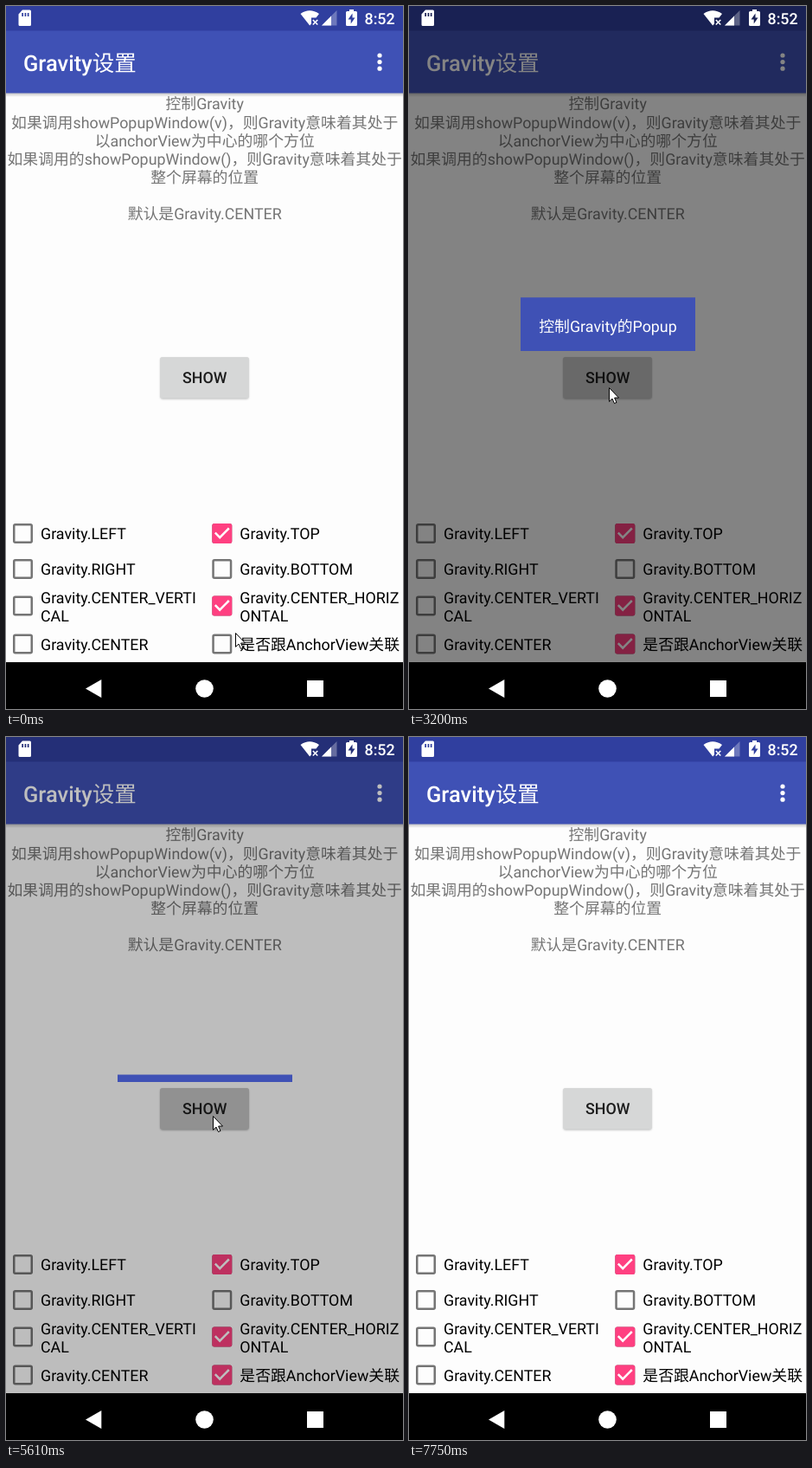
Recreate the animation shown at these times as an HTML page. Size 459 by 811 pixels, loop 8.15 s.

```html
<!DOCTYPE html>
<html lang="zh-CN">
<head>
<meta charset="utf-8">
<title>Gravity</title>
<style>
html, body { margin: 0; width: 100%; height: 100%; overflow: hidden; background: #000; }
svg { display: block; width: 459px; height: 811px; font: 17.85px Roboto, "Noto Sans CJK SC", "Noto Sans CJK", sans-serif; }
text { text-rendering: geometricPrecision; }
.medium { font-weight: 500; }
.middle { text-anchor: middle; }
</style>
</head>
<body>
<svg viewBox="0 0 459 811">
  <defs>
    <linearGradient id="shade" x2="0" y2="1">
      <stop stop-opacity=".24"/><stop offset="1" stop-opacity="0"/>
    </linearGradient>
    <filter id="blur" x="-10%" y="-20%" width="120%" height="150%"><feGaussianBlur stdDeviation="1"/></filter>
    <clipPath id="buttonClip"><rect x="178" y="405" width="103" height="47.500" rx="2.5"/></clipPath>
    <clipPath id="popupClip"><rect x="129" y="190" width="202" height="208"/></clipPath>
    <clipPath id="pageClip"><rect width="459" height="757"/></clipPath>
  </defs>

  <rect width="459" height="757" fill="#fdfdfd"/>
  <rect y="100" width="459" height="5" fill="url(#shade)"/>
  <rect width="459" height="29" fill="#303f9f"/>
  <rect y="28.500" width="459" height="72" fill="#3f51b5"/>
  <text x="20" y="75" class="medium" font-size="25.5" fill="#fff">Gravity设置</text>
  <g fill="#fff"><circle cx="432" cy="57" r="2.6"/><circle cx="432" cy="64.6" r="2.6"/><circle cx="432" cy="72.2" r="2.6"/></g>
  <g id="intro" class="middle" fill="#757575"></g>

  <rect id="buttonShadow" x="178.500" y="406" width="102" height="47.500" rx="2.5" filter="url(#blur)"/>
  <rect x="178" y="405" width="103" height="47.500" rx="2.5" fill="#d6d7d7"/>
  <g clip-path="url(#buttonClip)"><circle id="buttonRipple"/></g>
  <text x="229.7" y="435.4" class="medium middle" fill="#1c1c1c">SHOW</text>

  <g clip-path="url(#pageClip)"><circle id="checkRipple" cx="250" cy="736"/></g>
  <g id="boxes"></g>
  <rect id="dim" width="459" height="757"/>

  <g fill="#fff">
    <path fill-rule="evenodd" d="M19 4.500H27.500Q29 4.500 29 6V21.500Q29 23 27.500 23H16Q14.500 23 14.500 21.500V9.500ZM18.300 8V12H20V8ZM21.600 8V12H23.300V8ZM24.800 8V12H26.500V8Z"/>
    <path d="M340.500 9Q351 1.500 362 9L358.500 13.500H353V20.500L351.200 22.500Z"/>
    <path d="M354.800 16L360.300 21.500M360.300 16L354.800 21.500" stroke="#fff" stroke-width="1.600"/>
    <path d="M365 22.500L382.500 5V22.500Z" opacity=".3"/>
    <path d="M365 22.500L376 11.500V22.500Z"/>
    <path fill-rule="evenodd" d="M397 4H402V6H404.500Q406 6 406 7.500V21.500Q406 23 404.500 23H394.500Q393 23 393 21.500V7.500Q393 6 394.500 6H397ZM400.500 8.500L395.500 15.500H398.700V20.500L403.500 13.500H400.500Z"/>
    <text x="414.500" y="21" class="medium">8:52</text>
  </g>

  <g clip-path="url(#popupClip)"><g id="popup">
    <rect x="129" y="190" width="202" height="210" fill="#3f51b5"/>
    <path d="M132 258.500H328M132 329.500H328" stroke="#b3bae0"/>
    <g id="items" class="middle" fill="#fff"></g>
  </g></g>

  <rect y="757" width="459" height="54"/>
  <g fill="#fff">
    <path d="M92 787.500L110.300 777V798Z"/><circle cx="229.500" cy="787.500" r="10.300"/><rect x="348" y="778" width="19" height="19"/>
  </g>
  <path id="cursor" d="M.5.500V16.300L4 13L6.500 18.500L9 17.400L6.600 12H11.500Z" fill="#fff" stroke="#000"/>
</svg>
<script>
const LOOP = 8150;
const $ = id => document.getElementById(id);
const clamp = x => Math.max(0, Math.min(1, x));
const ramp = (t, start, length) => clamp((t - start) / length);
const smooth = x => (1 - Math.cos(Math.PI * x)) / 2;
const decelerate = x => 1 - (1 - x) ** 2;
const set = (id, attrs) => { for (const k in attrs) $(id).setAttribute(k, attrs[k]); };
const label = (x, y, s) => `<text x="${x}" y="${y}">${s}</text>`;

$('intro').innerHTML = ['控制Gravity', '如果调用showPopupWindow(v)，则Gravity意味着其处于', '以anchorView为中心的哪个方位',
  '如果调用的showPopupWindow()，则Gravity意味着其处于', '整个屏幕的位置', '', '默认是Gravity.CENTER']
  .map((s, i) => label(229.7, 119.4 + i * 21.17, s)).join('');
$('items').innerHTML = [0, 1, 2].map(i => label(230, 230 + i * 71, '控制Gravity的Popup')).join('');

function checkbox(x, y, text, state) {
  const tick = `<g ${state === 'live' ? 'id="tick"' : ''}>
    <rect x="-11.500" y="-11.500" width="23" height="23" rx="2.500" fill="#ff4081"/>
    <path d="M-8 -.9L-2.600 4.600L8 -6" fill="none" stroke="#fff" stroke-width="2.500"/></g>`;
  const lines = text.split('|');
  const top = lines.length > 1 ? -2.6 : 6.9;
  return `<g transform="translate(${x} ${y})">
    <rect x="-10.250" y="-10.250" width="20.500" height="20.500" rx="1.500" fill="none" stroke="#757575" stroke-width="2.500"/>
    ${state ? tick : ''}${lines.map((s, i) => label(20.5, top + i * 21, s)).join('')}</g>`;
}
const LEFT = 19.5, RIGHT = 249.8;
$('boxes').innerHTML = [
  [LEFT, 608.5, 'Gravity.LEFT'], [RIGHT, 608.5, 'Gravity.TOP', 'on'],
  [LEFT, 649.5, 'Gravity.RIGHT'], [RIGHT, 649.5, 'Gravity.BOTTOM'],
  [LEFT, 692, 'Gravity.CENTER_VERTI|CAL'], [RIGHT, 692, 'Gravity.CENTER_HORIZ|ONTAL', 'on'],
  [LEFT, 736, 'Gravity.CENTER'], [RIGHT, 736, '是否跟AnchorView关联', 'live']
].map(a => checkbox(...a)).join('');

// Pointer stops: time, x, y
const stops = [[30, 265, 723], [220, 189, 655], [500, 267, 748], [650, 267, 748], [730, 243, 736],
  [920, 243, 736], [1040, 250, 734], [1190, 250, 734], [1220, 253, 734], [1990, 253, 734], [2050, 256, 731],
  [2280, 280, 600], [2530, 256, 483], [2560, 256, 483], [2680, 231, 440], [3350, 231, 440], [3650, 250, 484],
  [4600, 250, 484], [4890, 239, 437], [5750, 239, 437], [6070, 254, 467], [7350, 254, 467], [7750, 265, 815]];

function pointer(t) {
  const i = stops.findIndex(s => s[0] > t);
  if (i === 0) return stops[0].slice(1);
  if (i < 0) return stops[stops.length - 1].slice(1);
  const [a, b] = [stops[i - 1], stops[i]];
  const k = smooth(ramp(t, a[0], b[0] - a[0]));
  return [1, 2].map(n => a[n] + (b[n] - a[n]) * k);
}

// Each showing: press, popup start, dismissal
const shows = [
  { press: 2870, open: 3013, close: 4283, x: 231, y: 440 },
  { press: 5390, open: 5533, close: 7023, x: 239, y: 437 }
];

function draw(t) {
  const s = t < 5000 ? shows[0] : shows[1];
  const slide = smooth(ramp(t, s.open, 500)) - smooth(ramp(t, s.close, 500));
  const fade = decelerate(ramp(t, s.open, 300)) - decelerate(ramp(t, s.close, 300));
  set('popup', { transform: `translate(0 ${212 * (1 - slide)})` });
  set('dim', { opacity: 0.56 * fade });

  const pressed = ramp(t, s.press, 60) * (1 - ramp(t, s.press + 200, 300));
  set('buttonRipple', { cx: s.x, cy: s.y, r: 110 * decelerate(ramp(t, s.press, 150)), opacity: 0.1 * pressed });
  set('buttonShadow', { opacity: 0.25 + 0.1 * pressed });

  const checked = smooth(ramp(t, 1810, 170));
  set('tick', { opacity: checked });
  set('checkRipple', {
    r: 25 * decelerate(ramp(t, 1730, 180)), fill: checked > 0.5 ? '#ff4081' : '#000',
    opacity: 0.12 * ramp(t, 1730, 60) * (1 - ramp(t, 1840, 240))
  });
  set('cursor', { transform: `translate(${pointer(t).map(Math.round)})` });
}

function tick() {
  draw(performance.now() % LOOP);
  requestAnimationFrame(tick);
}
tick();
</script>
</body>
</html>
```
